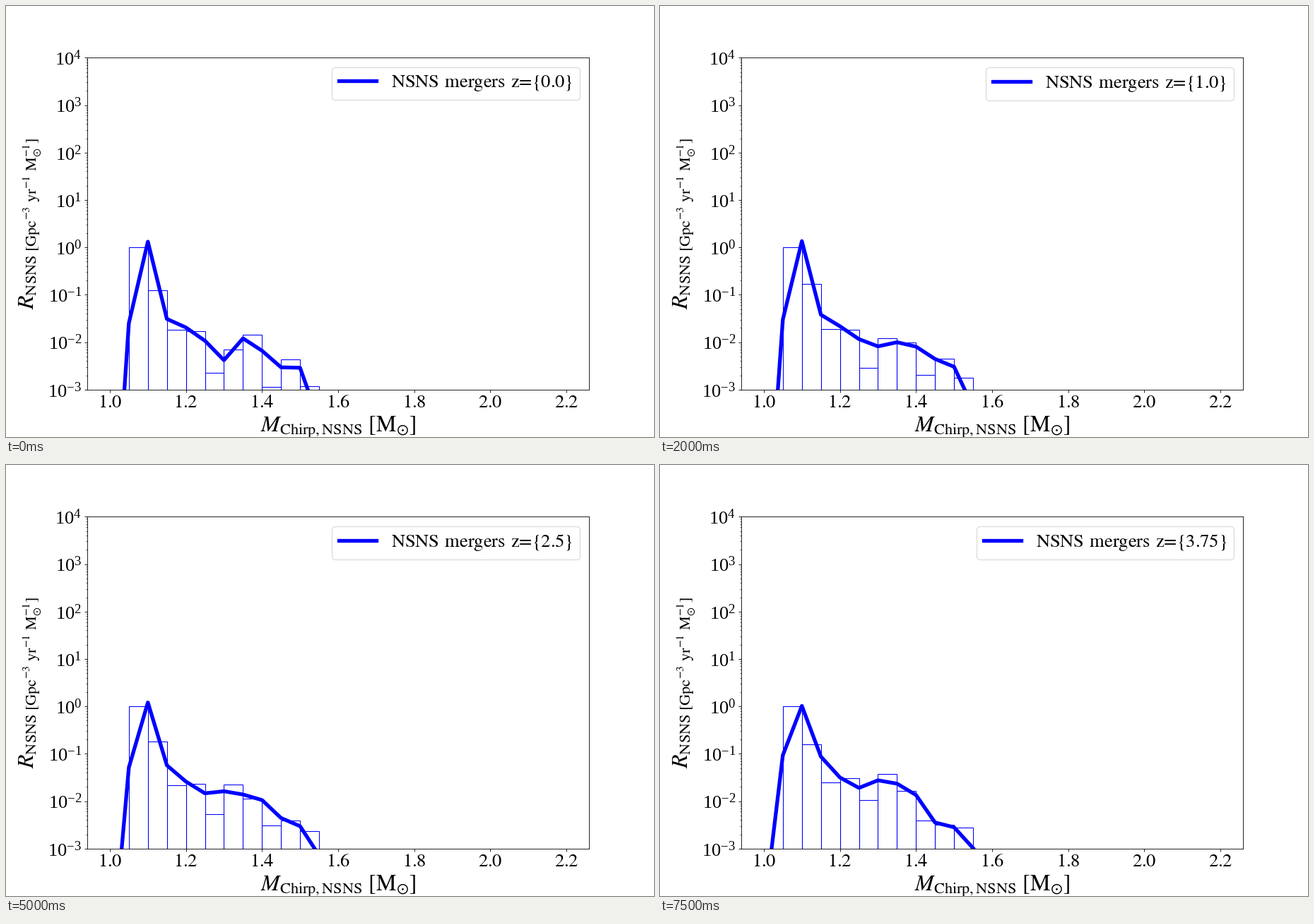
A matplotlib script for the animation above (8000 ms loop, 917 by 611 pixels).

```python
import numpy as np
import matplotlib.pyplot as plt
from matplotlib.animation import FuncAnimation
from matplotlib.ticker import FormatStrFormatter, LogLocator, MultipleLocator, NullFormatter

W, H, DPI = 917, 611, 76.4
FRAMES, INTERVAL = 16, 500
DZ = 0.25       # redshift step per frame
STEP = 0.05     # mass bin width
FLOOR = 1e-5

plt.rcParams.update({
    "font.family": "Liberation Serif",
    "mathtext.fontset": "stix",
    "font.size": 25,
})

# log10 rates in the first and last pose, one value per mass step.
CURVE = np.array([
    [-7.59, -1.60, 0.12, -1.51, -1.69, -1.97, -2.38, -1.92, -2.18, -2.53, -2.54, -3.67],
    [-4.36, -1.03, 0.01, -1.06, -1.50, -1.72, -1.56, -1.63, -1.87, -2.45, -2.55, -2.99],
])
BARS = np.array([
    [0, -0.91, -1.74, -1.77, -2.65, -2.15, -1.85, -2.95, -2.37, -2.93],
    [0, -0.80, -1.60, -1.51, -1.98, -1.42, -1.79, -2.41, -2.49, -2.56],
])
curve_x = 1.0 + STEP * np.arange(CURVE.shape[1])
bar_x = 1.05 + STEP * np.arange(BARS.shape[1])
STRAY_X = 1.70

# Passing bumps along the mass axis: centre, width, height.
BUMPS = [(1.125, 0.02, 0.14), (1.31, 0.02, 0.25), (1.365, 0.02, -0.24),
         (1.435, 0.03, 0.23), (1.545, 0.03, 0.22)]

LABEL = r"$\mathrm{NSNS\hspace{0.42}mergers\hspace{0.42}z\hspace{-0.2}=\hspace{-0.2}\{%s\}}$"


def swell(x):
    return sum(h * np.exp(-((x - c) / w) ** 2) for c, w, h in BUMPS)


def rates(poses, x, i):
    """Ease from pose to pose; the bumps rise and fade on the way."""
    u = i / (FRAMES - 1)
    first, last = poses
    return 10 ** (first + (last - first) * u ** 1.5 + swell(x) * np.sin(np.pi * u ** 0.75))


def bar_tops(i):
    stray = 10 ** (-2.95 - 0.12 * abs(i - 3))
    return np.append(rates(BARS, bar_x + STEP / 2, i), stray)


fig = plt.figure(figsize=((W + 1e-6) / DPI, (H + 1e-6) / DPI), dpi=DPI, facecolor="white")
ax = fig.add_subplot()
ax.set_yscale("log")

bars = ax.bar(np.append(bar_x, STRAY_X), bar_tops(0) - FLOOR, STEP, bottom=FLOOR,
              align="edge", fill=False, edgecolor="blue", linewidth=1)
line, = ax.plot(curve_x, rates(CURVE, curve_x, 0), color="blue", lw=5, label=LABEL % 0.0)

ax.set_xlim(0.94, 2.26)
ax.set_ylim(1e-3, 1e4)
ax.xaxis.set_major_locator(MultipleLocator(0.2))
ax.xaxis.set_major_formatter(FormatStrFormatter(r"$\mathrm{%.1f}$"))
ax.tick_params(axis="x", pad=4.5)
ax.yaxis.set_major_locator(LogLocator(numticks=12))
ax.yaxis.set_minor_locator(LogLocator(subs=np.arange(2, 10), numticks=12))
ax.yaxis.set_minor_formatter(NullFormatter())
ax.set_xlabel(r"$M_{\rm Chirp, NSNS}\ \mathrm{[M_{\odot}]}$", fontsize=30, labelpad=5)
ax.set_ylabel(r"$R_{\rm NSNS\ [Gpc^{-3}\ yr^{-1}\ M_{\odot}^{-1}]}$", fontsize=30, labelpad=6)
legend = ax.legend(loc="upper right", borderpad=0.37)


def update(i):
    line.set_ydata(rates(CURVE, curve_x, i))
    for bar, top in zip(bars, bar_tops(i)):
        bar.set_height(top - FLOOR)
    legend.get_texts()[0].set_text(LABEL % (i * DZ))
    return [line, legend, *bars]


anim = FuncAnimation(fig, update, frames=FRAMES, interval=INTERVAL, repeat=True)
plt.show()
```
